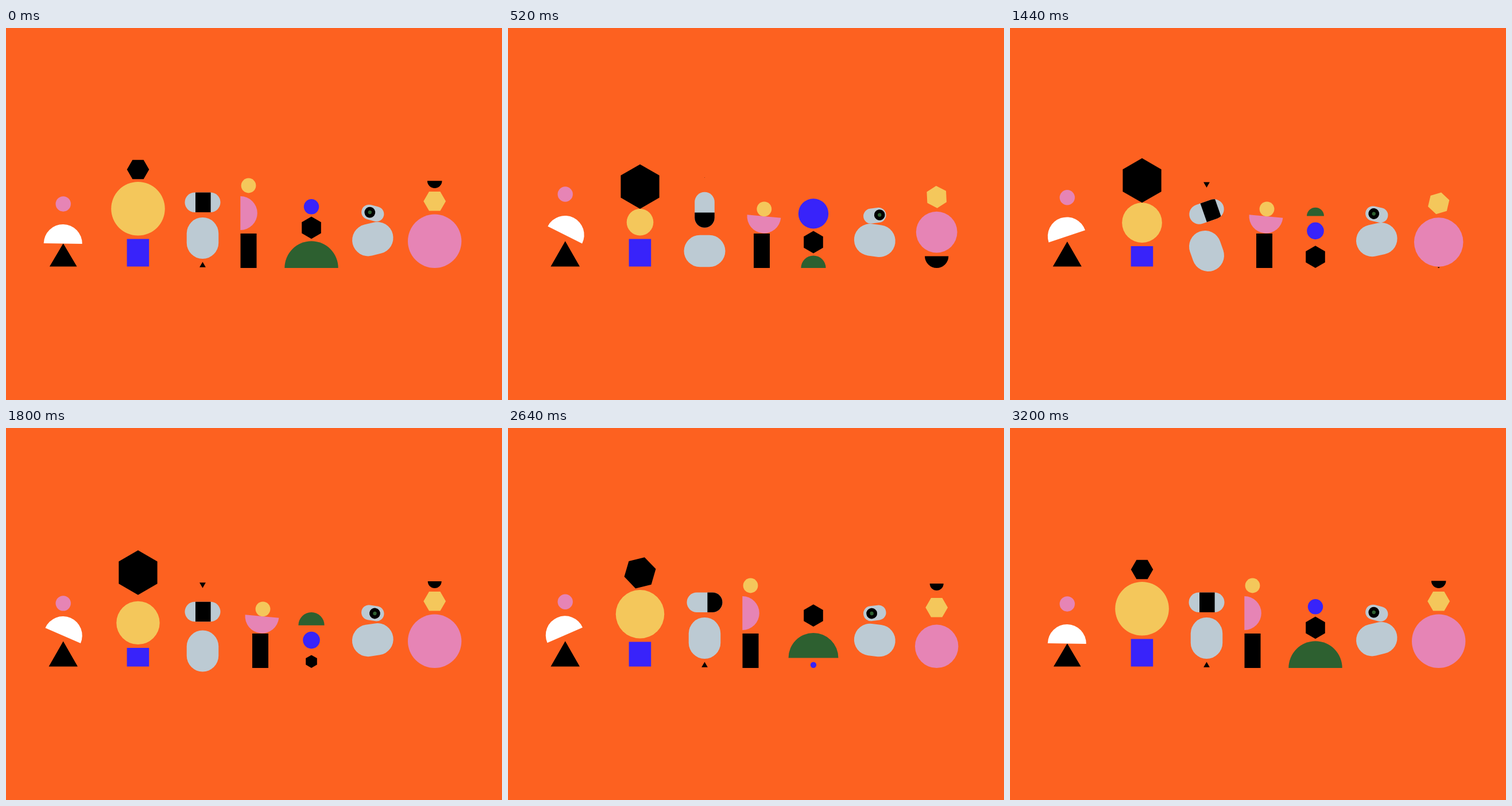
An HTML page with a canvas that plays this animation: 864 px wide and 648 px high, repeating every 3240 ms.

```html
<!DOCTYPE html>
<html lang="en">
<head>
<meta charset="utf-8">
<title>Shape people</title>
<style>
html, body { margin: 0; height: 100%; overflow: hidden; background: #fd6120; }
canvas { display: block; width: 864px; height: 648px; }
</style>
</head>
<body>
<canvas id="stage" width="864" height="648"></canvas>
<script>
const ctx = document.getElementById('stage').getContext('2d');
const LOOP = 3240, STEP = 40, CYCLE = 3200, TAU = Math.PI * 2, FLOOR = 418;
const ORANGE = '#fd6120', YELLOW = '#f4c75b', PINK = '#e684b5', BLUE = '#3823fa',
      GREY = '#bccad3', GREEN = '#2d6030', BLACK = '#000', WHITE = '#fff';

// Motion
const clamp = u => Math.min(Math.max(u, 0), 1);
const mix = (a, b, u) => a + (b - a) * u;
const ramp = (t, from, to) => {
  const u = clamp((t - from) / (to - from));
  return u * u * (3 - 2 * u);
};
const hump = (t, from, to) => Math.sin(Math.PI * clamp((t - from) / (to - from)));
const wave = (t, period, peak = 0) => Math.cos(TAU * (t - peak) / period);

// Eased moves from a start value; each move is [from, to, value].
const glide = (t, start, ...moves) =>
  moves.reduce((value, [from, to, goal]) => mix(value, goal, ramp(t, from, to)), start);

// Shapes
const rad = deg => deg * Math.PI / 180;

function at(x, y, deg, draw) {
  ctx.save();
  ctx.translate(x, y);
  ctx.rotate(rad(deg));
  draw();
  ctx.restore();
}

function fill(color, path) {
  ctx.fillStyle = color;
  ctx.beginPath();
  path();
  ctx.fill();
}

const circle = (x, y, r, color) => fill(color, () => ctx.arc(x, y, r, 0, TAU));

const rect = (x, y, w, h, color) => fill(color, () => ctx.rect(x, y, w, h));

// Half disc with the round side down at 0 degrees.
const half = (x, y, r, deg, color) => at(x, y, deg, () =>
  fill(color, () => ctx.arc(0, 0, r, 0, Math.PI)));

const hexagon = (x, y, r, deg, color) => at(x, y, deg, () => fill(color, () => {
  for (let i = 0; i < 6; i++) ctx.lineTo(r * Math.sin(i * TAU / 6), -r * Math.cos(i * TAU / 6));
}));

const triangle = (x, top, base, w, color) => fill(color, () => {
  ctx.moveTo(x, top);
  ctx.lineTo(x + w, base);
  ctx.lineTo(x - w, base);
});

const pill = (w, h, color) => fill(color, () => ctx.roundRect(-w / 2, -h / 2, w, h, Math.min(w, h) / 2));

// Stacks parts from the floor up; each part is [height, draw(middle)].
function pile(gap, parts) {
  let y = FLOOR;
  for (const [h, draw] of parts) {
    draw(y - h / 2);
    y -= h + gap * clamp(h / 16);
  }
}

function umbrella(t) {
  const s = wave(t, 1600, 400), dip = (1 - Math.abs(s)) ** 2;
  circle(99.7, 299 - 9.8 * wave(t, 800, 490), 13.2, PINK);
  triangle(99.7, 371.2 + 4 * dip, 415.5, 25.3 - 1.5 * dip, BLACK);
  half(99.2, 360.3 + 15.2 * dip, 33.5, 181 + 27 * s * (1.35 - 0.35 * s * s), WHITE);
}

// Hexagon rocking and hopping on a ball
function balancer(t) {
  const x = 230;
  const post = glide(t, 367.5, [1040, 1600, 383], [2240, 2880, 367.5]);
  const r = glide(t, 46.8, [0, 440, 23.3], [1040, 1600, 37.7], [2240, 3040, 46.8]);
  const ballY = post - 5.9 - r;
  const shrink = glide(t, 1, [0, 440, 0], [2240, 3000, 1]);
  const size = mix(38.8, 19.3, shrink), turn = 30 * shrink;
  const hop = 4.7 * shrink + 15 * hump(t, 0, 440) + 11 * hump(t, 1500, 2080);
  const rock = 5.2 * hump(t, 700, 1380) - 2.5 * hump(t, 2040, 2440);
  rect(x - 19.4, post, 38.6, 415.5 - post, BLUE);
  circle(x, ballY, r, YELLOW);
  at(x, ballY - r - hop, rock, () => hexagon(0, -size * Math.cos(rad(turn)), size, turn, BLACK));
}

function robot(t) {
  const x = 342.5;
  const bodyY = glide(t, 366, [0, 480, 388.5], [1840, 2640, 366]);
  const bodyDeg = glide(t, 0, [0, 480, 90], [880, 1680, 180]);
  const headY = glide(t, 303.7, [0, 480, 316.7], [560, 1040, 320], [1800, 2240, 303.7]);
  const headDeg = glide(t, 0, [0, 520, 90], [520, 1620, 360]) + 18 * hump(t, 2140, 2640);
  const slide = glide(t, 0.8, [0, 480, 18], [1100, 1700, 0.8], [2200, 2600, 18.2], [2680, 3160, 0.8]);
  const spike = glide(t, 1, [0, 200, 0], [440, 900, -1], [1840, 2200, 0], [2250, 2550, 1]);
  const spikeY = spike < 0 ? glide(t, 260, [400, 1600, 274]) : 412.1;
  at(x, bodyY, bodyDeg, () => pill(55.5, 72, GREY));
  at(x, headY, headDeg, () => {
    pill(62, 34.6, GREY);
    ctx.clip();
    rect(slide - 13.3, -18, 26.6, 36, BLACK);
  });
  triangle(x, spikeY - 4.7 * spike, spikeY + 4.7 * spike, 5.4 * spike, BLACK);
}

// Bowl tipping over on a post
function juggler(t) {
  const lean = glide(t, 0, [0, 600, 1], [1920, 2560, 0]);
  const tip = glide(t, 0, [0, 460, 1], [2000, 2640, 0]);
  const ballY = glide(t, 274.5, [0, 460, 315.3], [1900, 2300, 274.5]);
  rect(mix(408.5, 429, lean), 358, 28, 60, BLACK);
  half(mix(408.3, 446, tip), mix(322.5, 328, tip), 29.5, mix(-90, 5.5, tip), PINK);
  circle(mix(422.5, 447.5, lean), ballY, 12.9, YELLOW);
}

// The lowest part shrinks away and grows again on top.
function totem(t) {
  const x = 532;
  const dome = glide(t, 46.7, [100, 900, 0], [900, 1100, 12], [1100, 3000, 46.7]);
  const nut = glide(t, 19.4, [1640, 2000, 0], [2000, 2200, 19.4]);
  const bead = glide(t, 13.2, [0, 480, 26.2], [520, 1040, 14.8], [2400, 2800, 0], [2800, 3200, 13.2]);
  const parts = [
    [dome, y => half(x, y + dome / 2, dome, 180, GREEN)],
    [2 * nut, y => hexagon(x, y, nut, 0, BLACK)],
    [2 * bead, y => circle(x, y, bead, BLUE)]];
  const lowest = [900, 2000, 2800].filter(end => t >= end).length;
  const gap = glide(t, 4, [600, 1100, 11], [2640, 3200, 4]);
  pile(gap, parts.map((_, i) => parts[(i + lowest) % 3]));
}

function bird(t) {
  const x = 638.8, sway = 14.5 * wave(t, 1600, -30), blink = t % 1600;
  const eye = glide(blink, -5.2, [20, 320, 8.5], [680, 1000, -5.2]);
  at(x, 369.1 - 1.5 * wave(t, 800), -0.97 * sway, () => pill(72, 55.6, GREY));
  at(x, 322.4 + 4.5 * Math.max(0, wave(t, 800, 540)) ** 2, sway, () => {
    pill(39.6, 26, GREY);
    circle(eye, 0, 9.4, BLACK);
    circle(eye, 0, 3.2, GREEN);
  });
}

// Pink ball whose bowl swaps between top and bottom
function royal(t) {
  const x = 746.7, squash = hump(t, 2400, 2880);
  const ball = glide(t, 46.7, [0, 600, 35.3], [1040, 1700, 46.7]) - 9 * squash;
  const bowl = glide(t, 12.8, [0, 220, 0], [220, 640, 25.7], [1100, 1500, 0], [1500, 1800, 12]);
  const deg = glide(t, -30, [0, 640, 0], [1200, 1720, 30]);
  const parts = [
    [2 * ball, y => circle(x, y, ball, PINK)],
    [38.8 * Math.cos(rad(deg)), y => hexagon(x, y, 19.4, deg, YELLOW)]];
  const bowlPart = [bowl, y => half(x, y - bowl / 2, bowl, 0, BLACK)];
  pile(6 + 7 * squash, t > 220 && t < 1500 ? [bowlPart, ...parts] : [...parts, bowlPart]);
}

const cast = [umbrella, balancer, robot, juggler, totem, bird, royal];

function draw() {
  const step = Math.floor(performance.now() % LOOP / STEP + 0.05);
  const t = step * STEP % CYCLE;
  rect(0, 0, 864, 648, ORANGE);
  cast.forEach(figure => figure(t));
  requestAnimationFrame(draw);
}
draw();
</script>
</body>
</html>
```
